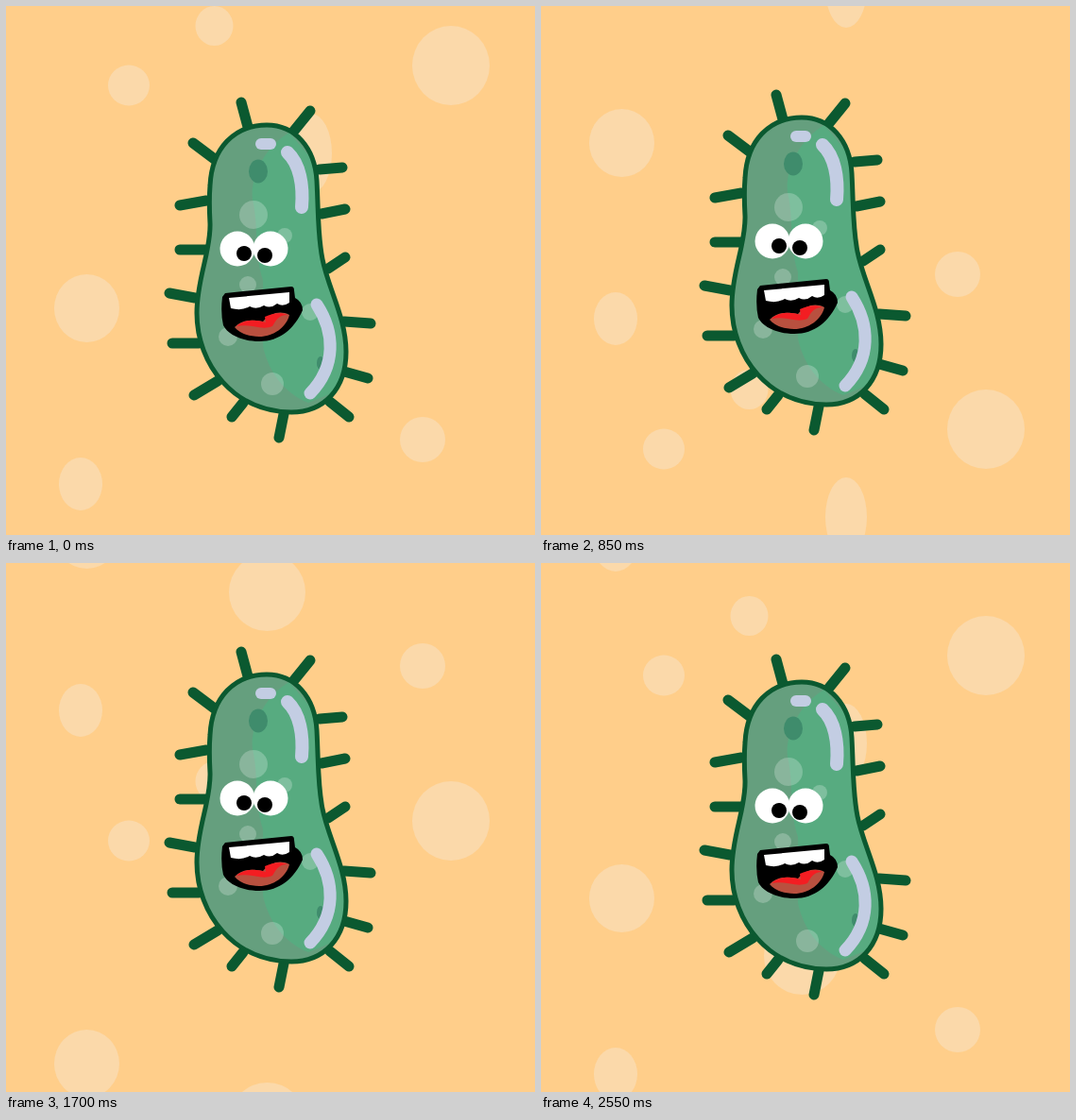
An HTML page that plays this animation: 560x560 px, repeating every 2.72 s.

```html
<!DOCTYPE html>
<html lang="en">
<head>
<meta charset="utf-8">
<title>Bacterium</title>
<style>
html, body { margin: 0; width: 100%; height: 100%; overflow: hidden; background: #ffce8a; }
svg { display: block; width: 100%; height: 100%; }
</style>
</head>
<body>
<svg viewBox="0 0 560 560">
  <defs>
    <path id="shape" d="M276 126C306 126 327 150 329 185C331 225 330 243 335 268C341 299 360 330 360 366C360 406 336 430 302 430C242 430 202 380 202 325C202 288 217 260 216 230C215 212 215 202 216 190C218 150 242 126 276 126Z"/>
    <clipPath id="inside"><use href="#shape"/></clipPath>
  </defs>
  <rect width="560" height="560" fill="#ffce8a"/>
  <g id="bubbles" fill="#fbd9aa"></g>
  <g id="germ">
    <path id="cilia" fill="none" stroke="#0b5930" stroke-width="11" stroke-linecap="round"/>
    <use href="#shape" fill="#659f7e"/>
    <g clip-path="url(#inside)">
      <path fill="#57ab80" d="M300 134C275 148 258 180 261 205C268 235 262 260 272 290L272 360C278 388 295 410 320 420L364 402L345 280L334 220L326 165Z"/>
      <g fill="#fff" fill-opacity=".23">
        <circle cx="262" cy="221" r="15"/>
        <circle cx="295" cy="243" r="8"/>
        <circle cx="256" cy="295" r="9"/>
        <circle cx="235" cy="350" r="10"/>
        <circle cx="282" cy="400" r="12"/>
        <circle cx="322" cy="324" r="9"/>
      </g>
      <g fill="#3f8c6c">
        <ellipse cx="267" cy="175" rx="10" ry="12.5"/>
        <ellipse cx="333" cy="378" rx="4" ry="7"/>
      </g>
    </g>
    <use href="#shape" fill="none" stroke="#0b5930" stroke-width="5"/>
    <g fill="none" stroke="#c3cde3" stroke-linecap="round">
      <path stroke-width="12" d="M270 146H280"/>
      <path stroke-width="14" d="M298 155C311 167 315 190 313 213"/>
      <path stroke-width="13" d="M329 316C348 345 350 381 322 410"/>
    </g>
    <g fill="#fff">
      <ellipse cx="245" cy="257" rx="18.5" ry="18.5"/>
      <ellipse cx="280" cy="257" rx="18.5" ry="18.5"/>
    </g>
    <circle cx="252" cy="262" r="8"/>
    <circle cx="274" cy="264" r="8"/>
    <path d="M232 304L302 297Q305 297 305 301L306 309Q314 313 314 322C305 342 290 355 268 355C250 355 235 348 230 338Q227 325 229 308Z"/>
    <path fill="#fff" d="M236 309L300 303L300 314Q293 319 287 315Q280 321 273 317Q265 322 258 318Q250 323 238 320Z"/>
    <path fill="#b9503f" d="M242 340C250 331 262 332 272 334C280 325 290 322 300 327C297 340 283 350 268 350C256 350 247 346 242 340Z"/>
    <path fill="#f31d22" d="M244 339C252 331 264 332 275 335L274 329C282 325 292 324 298 327C288 327 286 333 282 339C270 344 260 336 244 339Z"/>
  </g>
</svg>
<script>
const SIZE = 560, STEP_MS = 170, STEPS = 16, RISE = SIZE / STEPS;

// x, y, rx, ry at the start of the loop
const bubbles = [
  [220.5, 21, 20, 21],
  [130, 84, 22, 21.5],
  [471, 63, 41, 42],
  [85.5, 320, 34.5, 36],
  [441, 459, 24, 24],
  [79, 506, 23, 28],
  [323, 156, 22, 42],
  [276.5, 381, 40.5, 41]
];

// tip x, tip y, root x, root y
const cilia = [
  [249, 102, 256, 128], [322, 111, 305, 132], [198, 145, 222, 163], [356, 171, 332, 173],
  [184, 211, 212, 206], [359, 215, 334, 220], [184, 258, 214, 258], [359, 266, 341, 278],
  [173, 304, 200, 309], [386, 336, 358, 334], [176, 357, 204, 357], [383, 394, 358, 387],
  [199, 412, 224, 397], [239, 435, 251, 420], [289, 457, 294, 432], [363, 435, 343, 419]
];

const bubbleLayer = document.getElementById("bubbles");
const germ = document.getElementById("germ");

document.getElementById("cilia").setAttribute("d",
  cilia.map(([x1, y1, x2, y2]) => `M${x1} ${y1}L${x2} ${y2}`).join(""));

// Each bubble is stacked twice so it leaves the top while entering below
for (const [cx, cy, rx, ry] of bubbles) {
  for (const shift of [-SIZE, 0, SIZE]) {
    const dot = document.createElementNS("http://www.w3.org/2000/svg", "ellipse");
    const attrs = { cx, cy: cy + shift, rx, ry };
    for (const name in attrs) dot.setAttribute(name, attrs[name]);
    bubbleLayer.append(dot);
  }
}

function draw(ms) {
  const step = Math.floor(ms / STEP_MS) % STEPS;
  const lifted = step % 4 === 1 || step % 4 === 2;
  bubbleLayer.setAttribute("transform", `translate(0 ${-step * RISE})`);
  germ.setAttribute("transform", `translate(0 ${lifted ? -8 : 0})`);
}

const start = performance.now();
function tick() {
  draw(performance.now() - start);
  requestAnimationFrame(tick);
}
draw(0);
requestAnimationFrame(tick);
</script>
</body>
</html>
```
